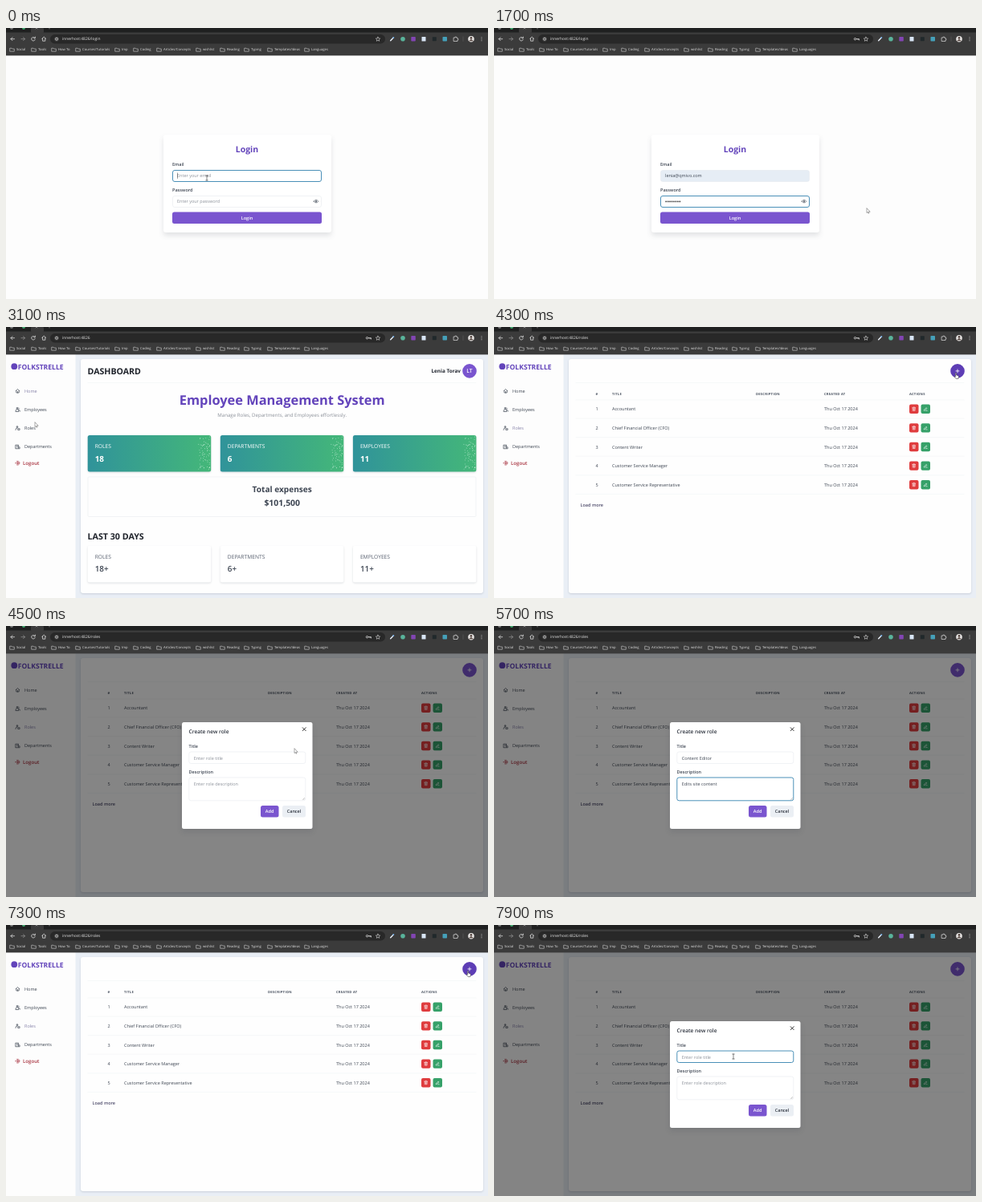
Write an HTML page that moves like this. It is 600 px wide and 338 px high and loops after 8000 ms.

```html
<!DOCTYPE html>
<html lang="en">
<head>
<meta charset="utf-8">
<title>Employee management demo</title>
<style>
html, body { margin: 0; height: 100%; overflow: hidden; background: #fdfdfd; }
svg { display: block; width: 100vw; height: 100vh; font-family: 'Open Sans', 'Noto Sans', sans-serif; }
text { white-space: pre; text-rendering: geometricPrecision; }
.card { filter: drop-shadow(0 4px 3px rgba(30, 40, 60, .12)); }
.soft { filter: drop-shadow(0 1px 1px rgba(30, 40, 60, .15)); }
</style>
</head>
<body>
<svg id="stage" viewBox="0 0 600 338" preserveAspectRatio="none"></svg>
<script>
const PURPLE = '#7a55cf', DEEP = '#6344bb', INK = '#3d4552', GREY = '#8b9099', BLUE = '#4a90b8', LINE = '#e6e9ee';
const HOST = 'innerhost:4826';
const EMAIL = 'lenia@qmivo.com', ROLE = 'Content Editor', NOTE = 'Edits site content';

// Markup helpers
const text = (x, y, s, size = 5.5, fill = INK, weight = 400, more = '') =>
  `<text x="${x}" y="${y}" font-size="${size}" fill="${fill}" font-weight="${weight}" ${more}>${s}</text>`;
const rect = (x, y, w, h, fill, rx = 0, more = '') =>
  `<rect x="${x}" y="${y}" width="${w}" height="${h}" rx="${rx}" fill="${fill}" ${more}/>`;
const dot = (x, y, r, fill, more = '') => `<circle cx="${x}" cy="${y}" r="${r}" fill="${fill}" ${more}/>`;
const path = (d, stroke, width = .8, fill = 'none', more = '') =>
  `<path d="${d}" stroke="${stroke}" stroke-width="${width}" fill="${fill}" stroke-linecap="round" stroke-linejoin="round" ${more}/>`;
const at = (x, y, s) => `<g transform="translate(${x} ${y})">${s}</g>`;
const group = (id, s) => `<g id="${id}">${s}</g>`;
const rule = y => path(`M102 ${y}H585`, '#edf0f3', .5);
const MID = 'text-anchor="middle"', END = 'text-anchor="end"';
const field = (id, x, y, w, h) => rect(x, y, w, h, '#fff', 2.5, `id="${id}" stroke="${LINE}" stroke-width=".6"`);

function browser() {
  const marks = [['Social', 13], ['Tools', 40], ['How To', 65], ['Courses/Tutorials', 95], ['Imp', 144],
    ['Coding', 167], ['Articles/Concepts', 196], ['wishlist', 245], ['Reading', 275], ['Typing', 305],
    ['Templates/Ideas', 334], ['Languages', 380]];
  const folder = 'M-2.6-1.8H-.6L.2-1H2.6V2.2H-2.6Z', pale = '#dcdcdc';
  return rect(0, 0, 600, 34.4, '#3b3b3b') + rect(0, 0, 600, 5.5, '#1f2020') + rect(31, 0, 16, 6, '#3b3b3b', 1) +
    dot(7, 0, 2, '#777') + dot(22, 0, 2, '#3fa66b') + path('M37-1l2 2m0-2l-2 2M54-1v2', '#bbb', .6) +
    rect(55, 8, 417, 11.5, '#282828', 5.7) +
    path('M10.5 13.7H6m2-2l-2 2 2 2', pale) + path('M19 13.7h4.5m-2-2l2 2-2 2', '#8d8d8d') +
    path('M36 12.5a2.3 2.3 0 1 0 .2 2M36.3 11v1.7h-1.7', pale) +
    path('M44.8 13.3l2.4-2.2 2.4 2.2M45.6 13v3.2h3.2V13', pale) +
    dot(63, 13.7, 2.8, '#4b4b4b') + dot(63, 13.7, 1.5, 'none', `stroke="${pale}" stroke-width=".7"`) +
    text(70, 15.3, '', 4.9, '#e6e6e6', 400, 'id="url"') +
    group('key', dot(449.5, 13.7, 1.2, 'none', `stroke="${pale}" stroke-width=".8"`) +
      path('M451 13.7h3.5v1.3m-1.5-1.3v1', pale)) +
    path('M463 11.2l.8 1.7 1.9.2-1.4 1.3.4 1.9-1.7-1-1.7 1 .4-1.9-1.4-1.3 1.9-.2Z', pale, .6) +
    path('M478.7 15.8l3.6-3.8', '#e8edf5', 1.5) + dot(482.3, 12, 1, '#6ca6df') +
    dot(494, 13.7, 2.8, '#59b49b') + rect(504.3, 11, 5.5, 5.5, '#8245b3', .8) +
    rect(517.5, 11, 5, 5.5, '#d8e5f5', .6) + rect(530.8, 11.2, 5, 5, '#20282b', .6) +
    rect(543.5, 11, 5.5, 5.5, '#45a0b9', .8) +
    path('M557.5 12h1.5v-.8h1.5v.8h1.5v1.5h.8V15h-.8v1.5h-4.5Z', pale, .7) + path('M569 11v5.5', '#666', .5) +
    dot(579, 13.7, 3.8, '#e9e7e5') + dot(579, 12.4, 1.4, '#54443f') +
    path('M576.5 16.3q2.500-3.500 5 0', '#54443f', .8, '#54443f') +
    [11.7, 13.7, 15.7].map(y => dot(592, y, .5, pale)).join('') +
    marks.map(([s, x]) => at(x - 5.3, 27, path(folder, '#cfcfcf', .6)) + text(x, 28.4, s, 4.2, '#e0e0e0')).join('');
}

function login() {
  const eye = path('M-2.8 0q2.8-3.6 5.6 0q-2.8 3.6-5.6 0Z', '#4b5360', .7) + dot(0, 0, 1, '#4b5360');
  return rect(0, 34, 600, 304, '#fdfdfd') + rect(196, 133, 209, 122, '#fff', 3, 'class="card"') +
    text(300, 154.8, 'Login', 10.5, DEEP, 700, MID) +
    text(207, 172, 'Email', 5.5, INK, 600) + field('mailBox', 207.5, 177.5, 185, 14) +
    text(213, 186.4, '', 5.5, GREY, 400, 'id="mail"') +
    text(207, 204, 'Password', 5.5, INK, 600) + field('passBox', 207.5, 209.5, 185, 14) +
    text(213, 218.4, 'Enter your password', 5.5, GREY, 400, 'id="pass"') + group('dots', '') +
    at(386, 216.2, eye) + rect(207, 229.4, 186, 14.6, PURPLE, 2.5) +
    text(300, 238.9, 'Login', 5.6, '#fff', 600, MID) +
    path('M213.5 181v6.5', '#333', .5, 'none', 'id="caret"');
}

function shell() {
  const icons = [
    'M-2.3 0L0-2.3 2.3 0M-1.7-.3V2.3H1.7V-.3M0 2.3V.8',
    'M-2.6 2.2q0-2.6 2-2.6t2 2.6ZM-.6-2.4a.9.9 0 1 0 .1 0M1.2-2.2q1.4.8 0 1.8M1.9.3q1 .5 1 1.9',
    'M-2.6 2.2q0-2.6 2-2.6M-.6-2.4a.9.9 0 1 0 .1 0M.6.5h2v1.7h-2Z',
    'M-2.3-2.3H1V2.3H-2.3ZM-1-1h.8M-1 .5h.8M1.6.3h1v2h-1'];
  const items = ['Home', 'Employees', 'Roles', 'Departments'].map((s, i) => {
    const y = 79.7 + i * 23.25;
    return at(14.5, y, path(icons[i], INK, .7)) + text(23, y + 2, s, 5.5, INK, 400, `id="nav${i}"`);
  });
  return rect(0, 34, 600, 304, '#e9eef5') + rect(0, 34, 86.5, 304, '#fdfdfd') +
    rect(93, 40, 501, 292, '#fefefe', 3, 'class="soft"') + rule(69.5) +
    dot(10.3, 49.2, 3.9, DEEP) + text(14.8, 52.5, 'FOLKSTRELLE', 8.6, DEEP, 700) + items.join('') +
    at(14.5, 169.7, path('M-1-2.2a2.4 2.4 0 1 1 0 4.4M-2.8 0H1M-.3-1.2L1 0-.3 1.2', '#a8323f')) +
    text(21, 172, 'Logout', 6.1, '#a8323f', 600);
}

// Scattered specks that thin out away from the right edge
function speckles(right) {
  let s = '', seed = 7;
  const random = () => (seed = seed * 16807 % 2147483647) / 2147483647;
  for (let i = 0; i < 75; i++)
    s += dot(right - 1 - 14 * random() ** 1.5, 137 + 42 * random(), .45, '#d9f5e5');
  return s;
}

function dashboard() {
  const stats = [['ROLES', 18], ['DEPARTMENTS', 6], ['EMPLOYEES', 11]];
  const cards = stats.map(([s, n], i) => {
    const x = 101.7 + i * 165.1;
    return rect(x, 135, 153.5, 45.5, 'url(#green)', 2.5, 'class="soft"') + speckles(x + 153) +
      text(x + 9, 150.6, s, 6.7, '#fff') + text(x + 9, 167.6, n, 9.9, '#fff', 700) +
      rect(x, 273, 153.5, 45.5, '#fff', 2, 'class="soft"') +
      text(x + 9, 288.7, s, 6.7, '#596170') + text(x + 9, 305.3, n + '+', 9.9, INK, 600);
  });
  return text(101.5, 59.2, 'DASHBOARD', 10.6, '#20242c', 700) +
    text(566, 57.3, 'Lenia Torav', 6.4, '#252a33', 700, END) +
    dot(577, 54.9, 8.8, PURPLE) + text(577, 57.4, 'LT', 6.8, '#fff', 600, MID) +
    text(343.7, 97.3, 'Employee Management System', 16.4, DEEP, 700, MID) +
    text(343.7, 112, 'Manage Roles, Departments, and Employees effortlessly.', 6.1, GREY, 400, MID) +
    rect(102, 187, 483, 49.5, '#fefefe', 1, 'stroke="#edf0f3" stroke-width=".7"') +
    text(343.7, 206, 'Total expenses', 10.1, INK, 700, MID) + text(343.7, 223.2, '$101,500', 10.4, INK, 700, MID) +
    text(101.5, 264.8, 'LAST 30 DAYS', 10.7, '#20242c', 700) + cards.join('');
}

function roles() {
  const names = ['Accountant', 'Chief Financial Officer (CFO)', 'Content Writer', 'Customer Service Manager',
    'Customer Service Representative'];
  const heads = [['#', 126.5], ['TITLE', 147], ['DESCRIPTION', 326], ['CREATED AT', 411], ['ACTIONS', 517]];
  const bin = 'M-1.9-1.5H1.9M-1.4-1.5V2H1.4V-1.5M-.6-2.3H.6M-.4-.3V1M.4-.3V1';
  const pen = 'M-1.7 1L.9-1.7 1.8-.8-.8 1.8H-1.7ZM.6 2H2';
  return dot(577, 54.9, 8.8, PURPLE, 'id="plus"') + path('M575 54.9h4m-2-2v4', '#fff') +
    heads.map(([s, x]) => text(x, 84.6, s, 4.1, '#4a5361', 700, 'letter-spacing=".25"')).join('') + rule(91) +
    names.map((s, i) => {
      const y = 102.3 + i * 23.6;
      return text(126.5, y + 2, i + 1) + text(147, y + 2, s) + text(411, y + 2, 'Thu Oct 17 2024') +
        rect(517, y - 5.7, 11.5, 11.4, '#df3c3e', 2) + at(522.7, y, path(bin, '#fff', .6)) +
        rect(531.5, y - 5.7, 11.5, 11.4, '#36a169', 2) + at(537.2, y, path(pen, '#fff', .6)) + rule(y + 11.7);
    }).join('') + text(107.5, 223.8, 'Load more', 5.5, '#4c4a69', 600);
}

function modal() {
  return rect(0, 34, 600, 304, '#000', 0, 'opacity=".48"') + rect(219, 120, 162.5, 133, '#fff', 2.5, 'class="card"') +
    text(227.5, 134, 'Create new role', 6.6, '#2b313c', 600) + path('M369.2 126.7l4 4m0-4l-4 4', '#222', .9) +
    text(227.5, 152, 'Title', 5.5, INK, 600) + field('titleBox', 227.8, 157, 145, 14.5) +
    text(233.7, 166.5, '', 5.5, GREY, 400, 'id="title"') +
    text(227.5, 184, 'Description', 5.5, INK, 600) + field('noteBox', 227.8, 189, 145, 28.8) +
    text(233.7, 198.7, '', 5.5, GREY, 400, 'id="note"') + path('M369.5 216.5l2-2m-.6 2l.6-.6', '#777', .4) +
    rect(317, 224, 22.5, 14.5, PURPLE, 2.5) + text(328.2, 233.3, 'Add', 5.6, '#fff', 600, MID) +
    rect(344, 224, 29, 14.5, '#ebeff4', 2.5) + text(358.5, 233.3, 'Cancel', 5.5, '#2b313c', 600, MID);
}

function toast() {
  return rect(488, 318, 108, 17.5, '#c3f3d3', 2, 'class="soft"') + rect(488, 318, 1.8, 17.5, '#36a169', .8) +
    dot(497.6, 326.6, 3.8, '#36a169') + path('M495.9 326.7l1.3 1.3 2.2-2.7', '#d8f8e2', .9) +
    text(506, 328.6, 'Role created', 5.5, '#26352c', 700) + path('M589.6 322l3 3m0-3l-3 3', '#33463a');
}

const pointers =
  group('arrow', path('M0 0V5.6L1.3 4.500 2.1 6.300 2.9 6 2.1 4.200H3.8Z', '#444', .45, '#fff')) +
  group('beam', path('M-1.2-3h2.4M0-3V3M-1.2 3h2.4', '#333', .6)) +
  group('hand', path('M-.6.5q.6-1 1.2 0V3l2.3.7q.8.3.6 1.3L3 7.5H.2L-1.9 5q0-1 1.3-.3Z', '#222', .5, '#fff'));

const stage = document.getElementById('stage');
stage.innerHTML =
  '<defs><linearGradient id="green"><stop stop-color="#30939a"/><stop offset="1" stop-color="#44b779"/></linearGradient></defs>' +
  group('login', login()) + group('shell', shell()) + group('dashboard', dashboard()) + group('roles', roles()) +
  group('modal', modal()) + group('toast', toast()) + browser() + group('cursor', pointers);

const el = {};
stage.querySelectorAll('[id]').forEach(e => el[e.id] = e);

const show = (id, on) => el[id].style.display = on ? '' : 'none';
const set = (id, name, value) => el[id].setAttribute(name, value);
const clamp = v => Math.max(0, Math.min(1, v));
const ramp = (t, a, b) => clamp((t - a) / (b - a));
const between = (t, a, b) => t >= a && t < b;
const typed = (s, t, a, b) => s.slice(0, Math.round(s.length * ramp(t, a, b)));
const focus = (id, on) => { set(id, 'stroke', on ? BLUE : LINE); set(id, 'stroke-width', on ? 1 : .6); };
function fill(id, value, hint) {
  el[id].textContent = value || hint;
  set(id, 'fill', value ? INK : GREY);
}

// Pointer stops: time, x, y
const route = [[0, 250, 187], [500, 250, 187], [800, 300, 216], [1400, 300, 216], [1700, 464, 225], [2300, 464, 225],
  [3100, 36, 119], [3300, 31, 126], [3500, 31, 126], [4200, 575, 57], [4350, 575, 57],
  [4500, 359, 153], [4700, 298, 164], [6300, 298, 164], [7200, 575, 57], [7500, 575, 57], [7800, 298, 164], [8000, 298, 164]];

function pointer(t) {
  const i = route.findIndex(p => p[0] > t);
  const [a, x, y] = route[i - 1], [b, u, v] = route[i];
  const k = ramp(t, a, b), e = k * k * (3 - 2 * k);
  return [x + (u - x) * e, y + (v - y) * e];
}

function draw(t) {
  const inLogin = t < 1800, inHome = between(t, 1800, 3300), inRoles = t >= 3300;
  show('login', inLogin);
  show('shell', !inLogin);
  show('dashboard', inHome);
  show('roles', inRoles);
  show('key', t >= 600);
  el.url.textContent = HOST + (inLogin ? '/login' : inRoles ? '/roles' : '');
  for (let i = 0; i < 4; i++) set('nav' + i, 'fill', i === (inHome ? 0 : 2) ? '#8580a8' : INK);

  fill('mail', t >= 500 ? EMAIL : '', 'Enter your email');
  set('mailBox', 'fill', t >= 500 ? '#e6edf5' : '#fff');
  focus('mailBox', t < 800);
  focus('passBox', t >= 800);
  show('caret', t < 500);
  const count = Math.round(8 * ramp(t, 900, 1400));
  show('pass', !count);
  el.dots.innerHTML = Array.from({ length: count }, (_, i) => dot(214.2 + i * 2.45, 216.4, .85, '#333')).join('');

  const second = t >= 7400;
  const opacity = second ? ramp(t, 7400, 7600) : ramp(t, 4350, 4450) * (1 - ramp(t, 5700, 5900));
  show('modal', opacity > 0);
  set('modal', 'opacity', opacity);
  fill('title', second ? '' : typed(ROLE, t, 4800, 5200), 'Enter role title');
  fill('note', second ? '' : typed(NOTE, t, 5200, 5600), 'Enter role description');
  focus('titleBox', between(t, 4700, 5200) || t >= 7800);
  focus('noteBox', between(t, 5200, 5900));

  const up = ramp(t, 5700, 5900);
  show('toast', between(t, 5800, 7100));
  set('toast', 'transform', `translate(0 ${20 * (1 - up)})`);
  set('toast', 'opacity', up * (1 - ramp(t, 6900, 7100)));

  // The pointer hides while keys are pressed
  const [x, y] = pointer(t), onPlus = between(t, 4100, 4400) || between(t, 7100, 7500);
  const overField = t < 1500 || between(t, 4600, 6300) || t >= 7700;
  const overLink = onPlus || between(t, 3200, 3600);
  show('cursor', !between(t, 900, 1400) && !between(t, 4800, 6400));
  set('cursor', 'transform', `translate(${x} ${y})`);
  show('beam', overField);
  show('hand', overLink);
  show('arrow', !overField && !overLink);
  set('plus', 'fill', onPlus ? '#5d3db5' : PURPLE);
}

const began = performance.now();
function tick() {
  draw(Math.floor((performance.now() - began) % 8000 / 100) * 100);
  requestAnimationFrame(tick);
}
tick();
</script>
</body>
</html>
```
